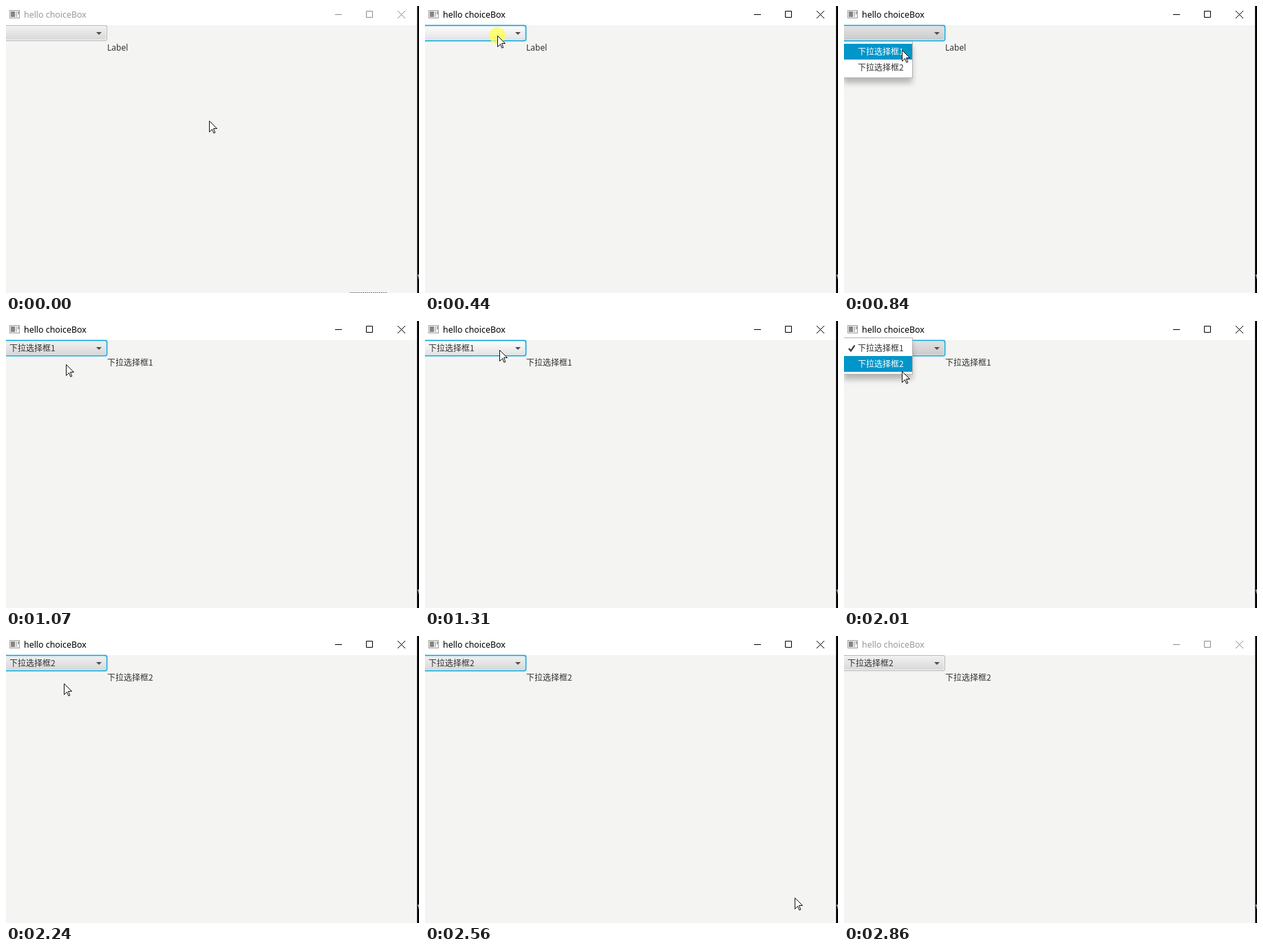
Animation of 600x418 px, one loop 2.94 s. Source, as an HTML page:

```html
<!DOCTYPE html>
<html lang="zh">
<head>
<meta charset="utf-8">
<title>hello choiceBox</title>
<style>
html, body { margin: 0; width: 100%; height: 100%; overflow: hidden; background: #f4f4f2; }
svg { display: block; width: 600px; height: 418px; }
text { font: 12px "Noto Sans", "Noto Sans CJK SC", sans-serif; fill: #333; white-space: pre; }
.cjk { font-family: "Noto Sans CJK SC", sans-serif; }
#title { font-size: 12.4px; }
</style>
</head>
<body>
<svg viewBox="0 0 600 418">
  <defs>
    <linearGradient id="rest" x2="0" y2="1">
      <stop stop-color="#efefef"/><stop offset="1" stop-color="#d9d9d9"/>
    </linearGradient>
    <linearGradient id="hover" x2="0" y2="1">
      <stop stop-color="#fbfbfb"/><stop offset="1" stop-color="#e4e4e4"/>
    </linearGradient>
    <linearGradient id="pressed" x2="0" y2="1">
      <stop stop-color="#e1e1e1"/><stop offset="1" stop-color="#ccc"/>
    </linearGradient>
    <filter id="shade" x="-20%" y="-20%" width="140%" height="160%">
      <feGaussianBlur stdDeviation="4"/>
    </filter>
  </defs>

  <rect width="600" height="418" fill="#f4f4f2"/>
  <rect width="597" height="28" fill="#fff"/>
  <rect x="597" width="3" height="418" fill="#000"/>
  <rect id="edge" x="597" width="1" height="418"/>
  <path d="M598 391h2v6h-1v-3h-1z" fill="#9a8a9a"/>
  <path id="dashes" d="M500 417.5h53" stroke="#777" stroke-dasharray="2 1"/>

  <g shape-rendering="crispEdges">
    <rect x="5.5" y="6.5" width="14" height="11" fill="#f4f4f4" stroke="#a0a0a0"/>
    <rect x="7" y="8" width="6" height="8" fill="#858585"/>
    <rect x="14" y="8" width="2" height="8" fill="#c4c4c4"/>
    <rect x="17" y="8" width="2" height="4" fill="#a8a8a8"/>
  </g>
  <text id="title" x="26" y="17">hello choiceBox</text>
  <path id="controls" d="M478 12.5h10M523.5 7.5h9v9h-9zM569 7l11 11M580 7l-11 11" fill="none"/>

  <g id="box"></g>
  <path d="M131 38h8l-4 4z" fill="#4d4d4d"/>
  <text id="value" class="cjk" x="5" y="44"></text>
  <text id="label" x="147" y="65"></text>

  <g id="popup">
    <rect x="-1" y="8" width="100" height="53" opacity=".26" filter="url(#shade)"/>
    <rect x="-1.5" y=".5" width="101" height="53" fill="#fff" stroke="#b3b3b3"/>
    <rect id="pick" x="-1" width="100" height="23" fill="#0096c9"/>
    <path id="check" d="M7 16l3 3.500 5.500-8" fill="none" stroke-width="2.200"/>
    <text id="item1" class="cjk" x="20" y="20">下拉选择框1</text>
    <text id="item2" class="cjk" x="20" y="43">下拉选择框2</text>
  </g>

  <g id="cursor">
    <circle id="press" r="12" fill="#ffff50" fill-opacity=".75"/>
    <path d="M.5.5v16l4-4 2.300 5.700 2-.7-2.300-6h5z" fill="#fff" stroke="#111"/>
  </g>
</svg>
<script>
const LOOP = 2940;
const STEP = 78.1, PHASE = 48; // sampling rhythm of the pointer
const OPTION = "下拉选择框";
const $ = id => document.getElementById(id);
const set = (id, attrs) => {
  for (const key in attrs) $(id).setAttribute(key, attrs[key]);
};

// Pointer stops: time, x, y
const stops = [
  [0, 295, 167], [435, 105, 43], [672, 100, 59], [752, 100, 59],
  [829, 84, 64], [1000, 84, 66], [1298, 108, 42], [1454, 108, 42],
  [1688, 99, 59], [1845, 84, 77], [1923, 84, 74], [2235, 84, 69],
  [2626, 590, 418]
];
const presses = [440, 910, 1380, 1920];

function pointerAt(t) {
  const time = Math.max(0, PHASE + STEP * Math.floor((t - PHASE) / STEP));
  const next = stops.findIndex(s => s[0] > time);
  if (next < 0) return stops.at(-1).slice(1);
  const a = stops[next - 1], b = stops[next];
  const u = (time - a[0]) / (b[0] - a[0]);
  const eased = u * u * (3 - 2 * u);
  return [1, 2].map(i => Math.round(a[i] + (b[i] - a[i]) * eased));
}

// One layer of the choice box, inset from its bounds
const layer = (inset, fill, extra = "") =>
  `<rect x="-20" y="${28 + inset}" width="${167 - inset}" height="${23 - 2 * inset}" rx="${3 - inset / 2}" fill="${fill}" ${extra}/>`;

function drawBox(focused, face) {
  const body = `url(#${face})`;
  $("box").innerHTML = focused
    ? layer(-.2, "#039ed3") + layer(1, "#fafafa") + layer(2, body) +
      layer(-1.4, "#039ed3", 'opacity=".13"') + layer(2.6, body)
    : layer(0, "#b5b5b5") + layer(1, "#f8f8f8") + layer(2, body);
}

function draw(t) {
  const within = (from, to) => t >= from && t < to;
  const [x, y] = pointerAt(t);
  const active = within(440, 2860);
  const first = within(520, 1070);
  const second = within(1460, 2160);
  const open = first || second;
  const over = x < 147 && y >= 28 && y < 51;
  const choice = t < 1070 ? 0 : t < 2160 ? 1 : 2;
  const picked = first ? Number(t >= 840) : t < 1770 ? 1 : 2;
  const ink = item => picked === item ? "#fff" : "#333";

  set("edge", { fill: active ? "#222" : "#555" });
  set("controls", { stroke: active ? "#000" : "#8c8c8c" });
  $("title").style.fill = active ? "#000" : "#999";
  set("dashes", { opacity: t < 70 ? 1 : 0 });

  drawBox(active, open ? "pressed" : over ? "hover" : "rest");
  $("value").textContent = choice ? OPTION + choice : "";
  $("label").textContent = choice ? OPTION + choice : "Label";
  set("label", { class: choice ? "cjk" : "" });

  set("popup", { display: open ? "inline" : "none", transform: `translate(0 ${first ? 51 : 24})` });
  set("pick", { y: picked === 2 ? 27 : 4, opacity: picked ? 1 : 0 });
  for (const item of [1, 2]) $("item" + item).style.fill = ink(item);
  set("check", { stroke: ink(1), opacity: second ? 1 : 0 });

  set("cursor", { display: t < 2630 ? "inline" : "none", transform: `translate(${x} ${y})` });
  set("press", { opacity: presses.some(p => within(p, p + STEP)) ? 1 : 0 });
}

const start = performance.now();
function tick() {
  draw((performance.now() - start) % LOOP);
  requestAnimationFrame(tick);
}
tick();
</script>
</body>
</html>
```
